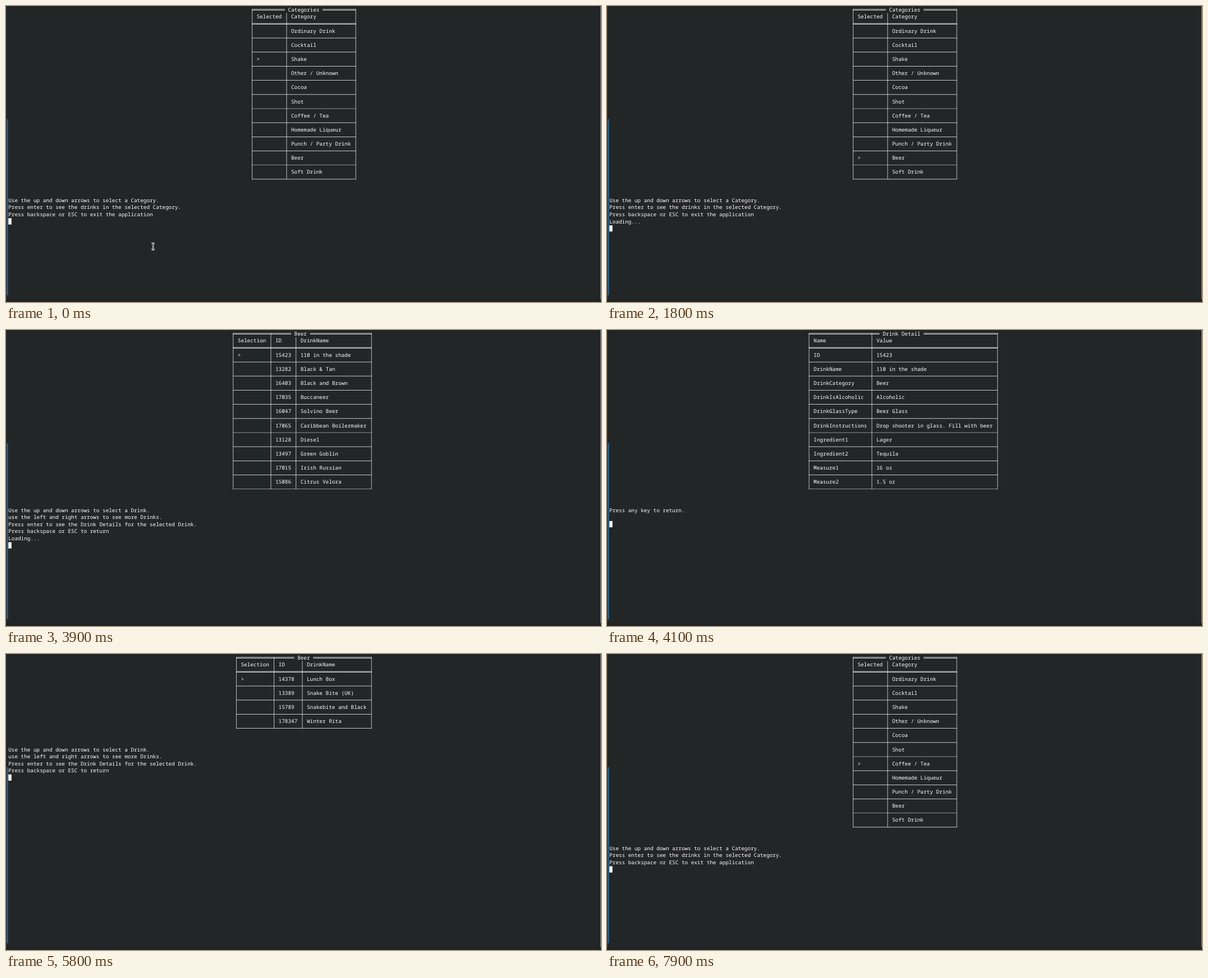
An HTML page with a canvas that plays this animation: 1060x528 px, repeating every 8 s.

```html
<!DOCTYPE html>
<html lang="en">
<head>
<meta charset="utf-8">
<title>Drink browser</title>
<style>
html, body { margin: 0; height: 100%; overflow: hidden; background: #232627; }
canvas { display: block; }
</style>
</head>
<body>
<canvas id="stage" width="1060" height="528"></canvas>
<script>
const ctx = document.getElementById('stage').getContext('2d');
// The terminal is laid out in 8 x 18 cells and shown reduced.
const CELL = 8, LINE = 18, MARGIN = 6, COLS = 188, SCALE = 0.6997, LOOP = 8000;
const INK = '#fcfcfc';

const drinkHelp = [
  'Use the up and down arrows to select a Drink.',
  'use the left and right arrows to see more Drinks.',
  'Press enter to see the Drink Details for the selected Drink.',
  'Press backspace or ESC to return'
];

const drinkList = rows => ({
  title: 'Beer', head: ['Selection', 'ID', 'DrinkName'],
  rows: rows.map(r => ['', ...r]), help: drinkHelp
});

const categories = {
  title: 'Categories', head: ['Selected', 'Category'],
  rows: ['Ordinary Drink', 'Cocktail', 'Shake', 'Other / Unknown', 'Cocoa', 'Shot',
    'Coffee / Tea', 'Homemade Liqueur', 'Punch / Party Drink', 'Beer', 'Soft Drink'
  ].map(name => ['', name]),
  help: [
    'Use the up and down arrows to select a Category.',
    'Press enter to see the drinks in the selected Category.',
    'Press backspace or ESC to exit the application'
  ]
};

const firstPage = drinkList([
  ['15423', '110 in the shade'], ['13282', 'Black & Tan'], ['16403', 'Black and Brown'],
  ['17035', 'Buccaneer'], ['16047', 'Solvino Beer'], ['17065', 'Caribbean Boilermaker'],
  ['13128', 'Diesel'], ['13497', 'Green Goblin'], ['17015', 'Irish Russian'],
  ['15086', 'Citrus Velora']
]);

const secondPage = drinkList([
  ['14378', 'Lunch Box'], ['13389', 'Snake Bite (UK)'],
  ['15789', 'Snakebite and Black'], ['178347', 'Winter Rita']
]);

const detail = {
  title: 'Drink Detail', head: ['Name', 'Value'],
  rows: [
    ['ID', '15423'], ['DrinkName', '110 in the shade'], ['DrinkCategory', 'Beer'],
    ['DrinkIsAlcoholic', 'Alcoholic'], ['DrinkGlassType', 'Beer Glass'],
    ['DrinkInstructions', 'Drop shooter in glass. Fill with beer'],
    ['Ingredient1', 'Lager'], ['Ingredient2', 'Tequila'],
    ['Measure1', '16 oz'], ['Measure2', '1.5 oz']
  ],
  help: ['Press any key to return.', '']
};

// start time, screen, selected row, loading
const steps = [
  [0, categories, 2], [300, categories, 3], [500, categories, 4], [700, categories, 5],
  [900, categories, 6], [1100, categories, 7], [1300, categories, 8], [1600, categories, 9],
  [1800, categories, 9, true], [2100, firstPage, 0], [3900, firstPage, 0, true],
  [4100, detail, -1], [5500, firstPage, 0], [5800, secondPage, 0],
  [6800, categories, 9], [7400, categories, 8], [7900, categories, 6]
];

const colX = col => MARGIN + col * CELL;
const midX = col => colX(col) + CELL / 2;
const midY = row => row * LINE + LINE / 2;

function rect(x, y, w, h, color = INK) {
  ctx.fillStyle = color;
  ctx.fillRect(x, y, w, h);
}

function text(str, col, row) {
  ctx.fillStyle = INK;
  ctx.fillText(str, colX(col), row * LINE + 14);
}

const hLine = (x1, x2, y) => rect(x1, y, x2 - x1, 1);

function doubleLine(x1, x2, row) {
  hLine(x1, x2, midY(row) - 1);
  hLine(x1, x2, midY(row) + 1);
}

function drawTable({ title, head, rows }, selected) {
  const widths = head.map((h, i) => Math.max(h.length, ...rows.map(r => r[i].length)) + 3);
  const total = widths.reduce((a, b) => a + b, 1);
  const left = Math.floor((COLS - total) / 2);
  const edges = [left];
  for (const w of widths) edges.push(edges.at(-1) + w);

  const titleCol = left + Math.floor((total - title.length) / 2);
  const gapStart = titleCol - 1, gapEnd = titleCol + title.length + 1;
  const bottom = 2 + 2 * rows.length;
  const x1 = midX(left), x2 = midX(edges.at(-1)) + 1;

  text(title, titleCol, 0);
  doubleLine(x1, colX(gapStart), 0);
  doubleLine(colX(gapEnd), x2, 0);
  doubleLine(x1, x2, 2);
  for (let row = 4; row <= bottom; row += 2) hLine(x1, x2, midY(row));
  for (const col of edges) {
    const hidden = col >= gapStart && col < gapEnd;
    const top = hidden ? LINE : midY(0) - 1;
    rect(midX(col), top, 1, midY(bottom) + 1 - top);
  }

  [head, ...rows].forEach((cells, i) => {
    cells.forEach((cell, c) => text(cell, edges[c] + 2, 1 + 2 * i));
  });
  if (selected >= 0) text('>', left + 2, 3 + 2 * selected);
  return bottom + 3;
}

function drawTerminal(screen, selected, loading) {
  ctx.save();
  // The tiny skew keeps text baselines from snapping to whole pixels.
  ctx.transform(SCALE, 1e-5, 0, SCALE, 0, 0);
  ctx.font = '13.333px "Noto Sans Mono", "DejaVu Sans Mono", monospace';
  ctx.textRendering = 'geometricPrecision';
  let row = drawTable(screen, selected);
  for (const line of screen.help) text(line, 0, row++);
  if (loading) text('Loading...', 0, row++);
  rect(colX(0), row * LINE + 1, CELL, LINE - 2);
  ctx.restore();
}

function drawPointer() {
  const beam = new Path2D('M259 423.5h2l1 1 1-1h2M262 424.5v9M259 434.5h2l1-1 1 1h2');
  for (const [width, color] of [[2.6, INK], [0.9, '#111']]) {
    ctx.lineWidth = width;
    ctx.strokeStyle = color;
    ctx.stroke(beam);
  }
}

function draw(now) {
  const t = now % LOOP;
  const [start, ...view] = steps.findLast(s => s[0] <= t);

  rect(0, 0, 1060, 528, '#232627');
  rect(0, 0, 1, 528, '#313536');
  rect(1059, 0, 1, 528, '#8c8f90');
  rect(0, 523, 1060, 5, '#212425');
  rect(1.4, 202, 2.1, 314, '#226da5');

  drawTerminal(...view);
  if (start === 0) drawPointer();
  requestAnimationFrame(draw);
}
requestAnimationFrame(draw);
</script>
</body>
</html>
```
